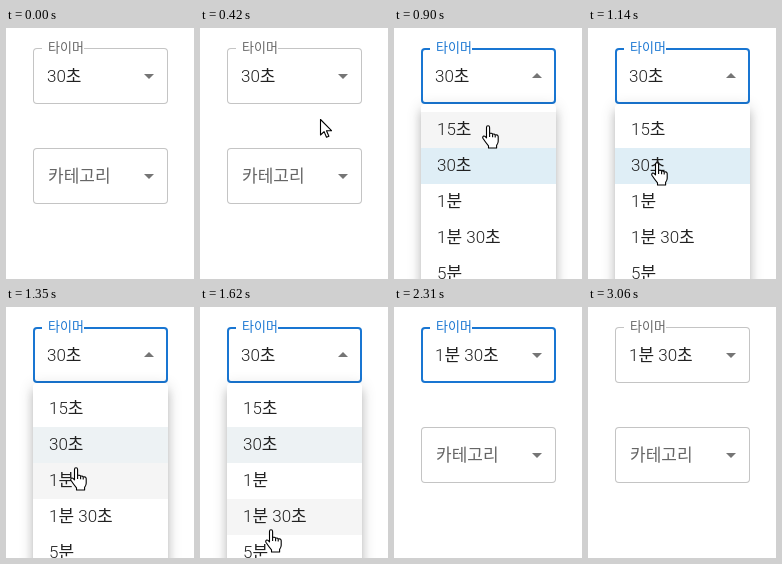
Write an HTML page that moves like this. It is 188x251 px and loops after 3090 ms.

```html
<!DOCTYPE html>
<html lang="ko">
<head>
<meta charset="utf-8">
<style>
html, body { margin: 0; width: 100%; height: 100%; overflow: hidden; background: #fff }
body { position: relative; font: 300 17px Roboto, "Noto Sans CJK KR Light", "Noto Sans CJK KR", "Noto Sans CJK", sans-serif; color: #212121 }
.field, .menu, .label, .caret, svg { position: absolute; box-sizing: border-box }
.field { left: 27px; width: 135px; height: 56px; border-radius: 4px; line-height: 56px; padding-left: 14px; white-space: pre }
.category { top: 120px; padding-left: 15px; color: #666; box-shadow: inset 0 0 0 1px #c4c4c4 }
.label { left: 9px; top: -6px; width: 42px; height: 11px; padding-left: 6px; background: #fff; font-size: 13px; line-height: 11px }
.caret { left: 111px; top: 26px; border: 5px solid transparent; border-top-color: #757575; border-bottom: 0 }
.caret.up { top: 25px; transform: scaleY(-1) }
.menu { left: 27px; top: 76px; width: 135px; height: 300px; padding: 8px 0; border-radius: 4px; background: #fff; transform-origin: 50% 0;
  box-shadow: 0 5px 5px -3px #0003, 0 8px 10px 1px #00000024, 0 3px 14px 2px #0000001f }
.menu div { height: 36px; line-height: 34px; padding-left: 16px; white-space: pre }
svg { left: 0; top: 0; overflow: visible; fill: #fff; stroke: #000; stroke-width: 1.1; stroke-linejoin: round }
</style>
</head>
<body>
<div class="field" id="timer" style="top:20px"><span id="value"></span><span class="label" id="label">타이머</span><i class="caret" id="caret"></i></div>
<div class="field category">카테고리<i class="caret"></i></div>
<div class="menu" id="menu"><div>15초</div><div>30초</div><div>1분</div><div>1분 30초</div><div>5분</div></div>
<svg id="cursor" width="20" height="25">
  <path id="arrow" d="M.5.5v15.5l3.6-3.4 2.4 5.6 2.4-1-2.4-5.5h5z"/>
  <g id="hand" transform="translate(-6 0)">
    <path d="M6 .8q1.6 0 1.6 1.7v6l1-.2q1.6-.3 2 .9q2-.6 2.6.8 2.6-.6 3 1.6v4.6q0 2-1.6 4.2v2.6H6.5v-2.2q-3-3.6-5.6-7.6-.6-1.6.8-2.1 1.3-.3 2.8 1.8V2.5Q4.5.8 6 .8Z"/>
    <path fill="none" d="M7.6 8.5v3.5M10.6 9.3v3M13.2 10.2v2.4"/>
  </g>
</svg>
<script>
const LOOP = 3090, STEP = 30, OPEN = 550, PICK = 2070, BLUR = 3000;
const $ = id => document.getElementById(id);
const clamp = v => Math.max(0, Math.min(1, v));
const rows = [...$('menu').children];

// Pointer tip: [time, x, y]
const path = [[90, 189, 224], [510, 111, 73], [720, 111, 73], [1140, 69, 134], [1200, 69, 134],
  [1620, 71, 222], [1770, 71, 222], [1890, 73, 207], [2070, 73, 207], [2310, 178, 260]];

// cubic-bezier(.4, 0, .2, 1)
function ease(x) {
  let lo = 0, hi = 1, p;
  for (let i = 0; i < 20; i++) {
    p = (lo + hi) / 2;
    const q = 1 - p;
    if (1.2 * q * q * p + .6 * q * p * p + p ** 3 < x) lo = p; else hi = p;
  }
  return 3 * (1 - p) * p * p + p ** 3;
}

function pointer(t) {
  const i = path.findIndex(k => k[0] > t);
  if (i < 1) return [300, 300];
  const [t0, x0, y0] = path[i - 1], [t1, x1, y1] = path[i];
  const u = (t - t0) / (t1 - t0), s = u * u * (3 - 2 * u);
  return [x0 + (x1 - x0) * s, y0 + (y1 - y0) * s];
}

function draw(t) {
  const picked = t >= PICK, open = t >= OPEN && !picked, focus = t >= OPEN && t < BLUR;
  const [x, y] = pointer(t);
  const inside = x > 27 && x < 162;
  const overField = inside && y > 20 && y < 76;
  const hoverRow = open && t > 720 && inside ? Math.floor((y - 84) / 36) : picked ? 3 : -1;

  $('value').textContent = picked ? '1분 30초' : '30초';
  $('caret').classList.toggle('up', open);
  $('timer').style.boxShadow = 'inset 0 0 0 ' + (focus ? '2px #1976d2' : overField ? '1px #212121' : '1px #c4c4c4');
  const blue = clamp((t - OPEN) / 200) * (1 - clamp((t - BLUR + STEP) / 90));
  $('label').style.color = `color-mix(in srgb, #1976d2 ${blue * 100}%, #666)`;

  const u = clamp(picked ? (t - 2020) / 290 : (t - OPEN) / 312);
  const alpha = picked ? 1 - ease(u) : ease(u);
  const grow = picked ? 1 - ease(clamp(u * 1.5 - .5)) : ease(clamp(u * 1.5));
  const scale = .75 + .25 * grow;
  $('menu').style.opacity = t < OPEN || u === 1 && picked ? 0 : alpha;
  $('menu').style.transform = `scale(${scale}, ${scale * scale})`;

  const selected = picked ? 3 : 1;
  rows.forEach((row, i) => {
    const hover = i === hoverRow;
    row.style.background = i === selected ? (hover || t < 1200 ? '#dfeef6' : '#edf2f4') : hover ? '#f5f5f5' : '';
  });

  const hand = overField && !open || open && hoverRow >= 0 || picked && t < PICK + STEP;
  $('hand').style.display = hand ? '' : 'none';
  $('arrow').style.display = hand ? 'none' : '';
  $('cursor').style.transform = `translate(${Math.round(x)}px, ${Math.round(y)}px)`;
}

function frame() {
  draw(Math.floor(performance.now() % LOOP / STEP) * STEP);
  requestAnimationFrame(frame);
}
frame();
</script>
</body>
</html>
```
